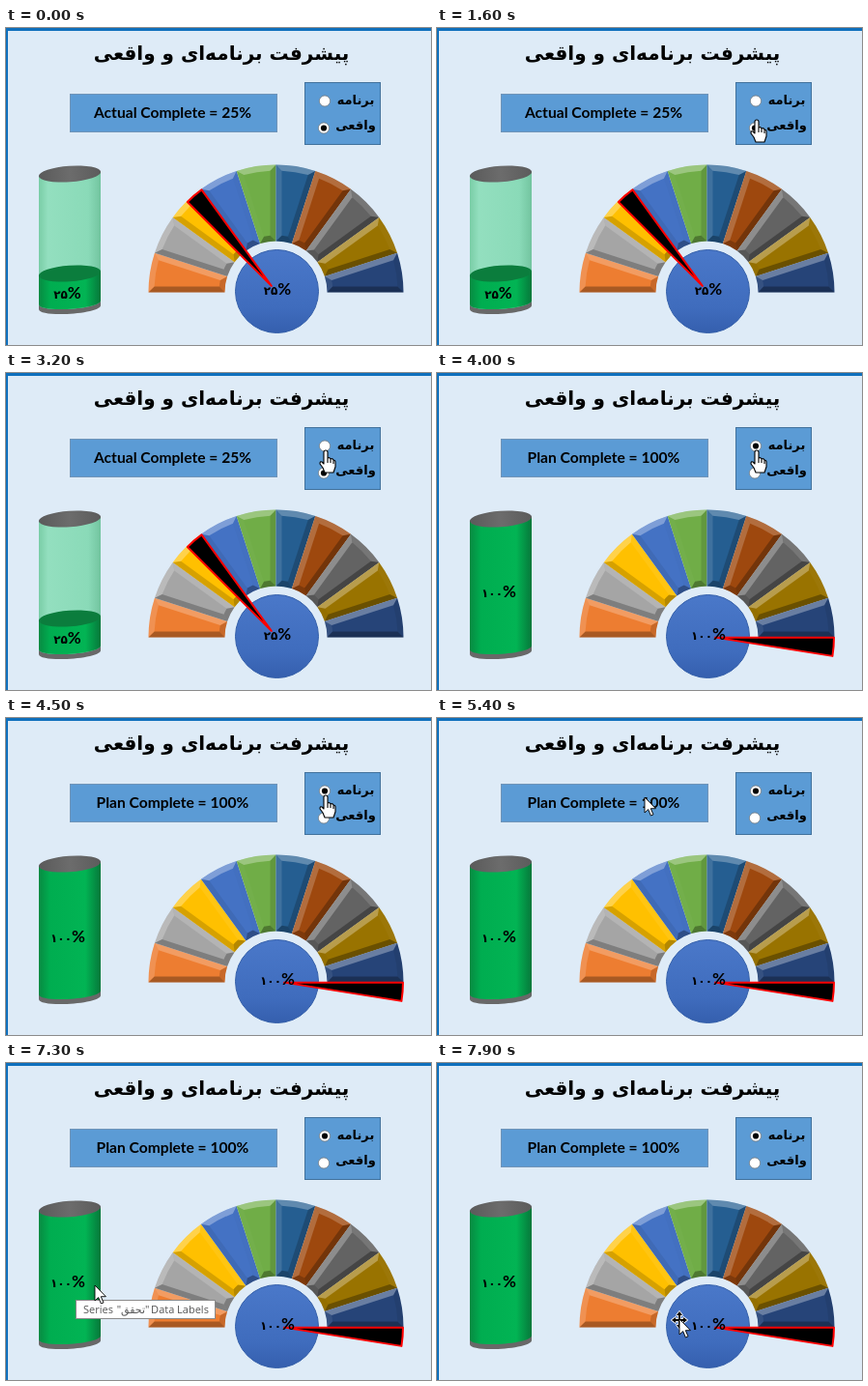
These frames come from a looping animation (440 by 328 pixels, 8000 ms). An HTML page:

```html
<!DOCTYPE html>
<html lang="fa">
<head>
<meta charset="utf-8">
<title>Progress gauge</title>
<style>
html, body { margin: 0; width: 100%; height: 100%; overflow: hidden; background: #deebf7; }
svg { display: block; width: 440px; height: 328px; }
text { text-anchor: middle; fill: #000; }
.fa { font-family: "DejaVu Sans", sans-serif; font-weight: 700; direction: rtl; }
.en { font-family: Lato, "Open Sans", sans-serif; font-weight: 700; font-size: 15.6px; }
.num { direction: ltr; font: 700 12px "DejaVu Sans", sans-serif; }
.pct { font: 700 17px Lato, sans-serif; }
.tip text { font: 11px "Open Sans", sans-serif; fill: #575757; }
</style>
</head>
<body>
<svg viewBox="0 0 440 328">
  <defs>
    <linearGradient id="glass">
      <stop offset="0" stop-color="#79cda6"/><stop offset=".15" stop-color="#93dfbf"/>
      <stop offset=".8" stop-color="#8adab8"/><stop offset="1" stop-color="#72c49f"/>
    </linearGradient>
    <linearGradient id="green">
      <stop offset="0" stop-color="#078a41"/><stop offset=".18" stop-color="#00ad50"/>
      <stop offset=".75" stop-color="#02b454"/><stop offset="1" stop-color="#06783a"/>
    </linearGradient>
    <linearGradient id="cap">
      <stop offset="0" stop-color="#5a5a5a"/><stop offset=".5" stop-color="#6c6c6c"/><stop offset="1" stop-color="#5c5c5c"/>
    </linearGradient>
    <linearGradient id="hub" x2="0" y2="1">
      <stop offset="0" stop-color="#4a78c9"/><stop offset=".7" stop-color="#3f6cbd"/><stop offset="1" stop-color="#355fae"/>
    </linearGradient>
  </defs>

  <rect width="440" height="328" fill="#deebf7"/>
  <path d="M0 0H440V3H2V328H0z" fill="#0f70bd"/>
  <text class="fa" x="223" y="33" font-size="20">پیشرفت برنامه&zwnj;ای و واقعی</text>

  <rect x="66.5" y="68.5" width="214" height="39" fill="#5b9bd5" stroke="#6f94b8"/>
  <text class="en" id="caption" x="172.5" y="93"></text>

  <rect x="309.5" y="56.5" width="78" height="64" fill="#5b9bd5" stroke="#41719c"/>
  <text class="fa" x="362" y="79" font-size="13">برنامه</text>
  <text class="fa" x="362" y="105" font-size="13">واقعی</text>
  <g fill="#fff" stroke="#77808a" stroke-width=".9">
    <circle cx="330" cy="75.5" r="5.6"/><circle cx="329" cy="103.5" r="5.6"/>
  </g>
  <circle id="dot" r="3.1"/>

  <g id="tank"></g>
  <text class="num" id="tankText"><tspan></tspan><tspan class="pct">%</tspan></text>

  <g id="dial"></g>
  <circle cx="280.5" cy="272.5" r="43" fill="url(#hub)" stroke="#3560aa"/>
  <path id="needle" stroke="#f00" stroke-width="2" stroke-linejoin="round"/>
  <text class="num" id="dialText" x="281" y="276"><tspan></tspan><tspan class="pct">%</tspan></text>

  <g class="tip" id="tip">
    <rect x="72.5" y="245.5" width="144" height="19" fill="#fff" stroke="#8a8a8a"/>
    <text x="95.5" y="259">Series</text>
    <text x="131.5" y="259" direction="ltr">"تحقق"</text>
    <text x="180" y="259">Data Labels</text>
  </g>

  <g id="cursor" fill="#fff" stroke="#000" stroke-linejoin="round">
    <path id="hand" stroke-width="1.1" d="M0 0Q2 0 2 2V8Q4 7 5 9Q7 8 8 10Q10 10 10 12V17L8 23H-1L-3 18L-6 14Q-6 11 -4 12L-2 14V2Q-2 0 0 0zM2 8V13M5 9V13M8 10V14"/>
    <path id="cross" fill="#000" stroke="#fff" stroke-width="1.6" paint-order="stroke" d="M0 -8L3 -4H1V0H4V-2L8 1L4 4V2H1V6H3L0 10L-3 6H-1V2H-4V4L-8 1L-4 -2V0H-1V-4H-3z"/>
    <path id="arrow" stroke-width=".9" d="M0 0V16L3.7 12.6L6.4 19L9 17.9L6.3 11.7H11.4z"/>
  </g>
</svg>
<script>
const LOOP = 8000, SWITCH = 4000;
const CX = 279.5, CY = 273.5, OUT = 132, INN = 53, BEVEL = 6;
const $ = id => document.getElementById(id);
const rad = deg => deg * Math.PI / 180;

// Dial angles run clockwise from the left end
const at = (r, a, x = CX, y = CY) =>
  `${(x - r * Math.cos(a)).toFixed(2)} ${(y - r * Math.sin(a)).toFixed(2)}`;
const arc = (r, a, b) => `M${at(r, a)}A${r} ${r} 0 0 1 ${at(r, b)}`;
const band = (r1, a1, b1, r2, a2, b2) =>
  `${arc(r1, a1, b1)}L${at(r2, b2)}A${r2} ${r2} 0 0 0 ${at(r2, a2)}z`;
const path = (d, fill, op = 1) => `<path d="${d}" fill="${fill}" fill-opacity="${op}"/>`;

// Bevel face lit from above, slightly from the left
function face(d, normal) {
  const lit = Math.sin(normal) * .85 + Math.cos(normal) * .35;
  return path(d, lit > 0 ? '#fff' : '#000', (Math.abs(lit) * .34).toFixed(2));
}

function slice(color, i) {
  const a = rad(i * 18), b = rad(i * 18 + 18);
  const o = OUT - BEVEL, n = INN + BEVEL;
  const po = Math.asin(BEVEL / o), pn = Math.asin(BEVEL / n);
  const side = (e, s) =>
    `M${at(OUT, e)}L${at(o, e + s * po)}L${at(n, e + s * pn)}L${at(INN, e)}z`;
  const mid = (a + b) / 2;
  return path(band(OUT, a, b, INN, a, b), color) +
    face(band(OUT, a, b, o, a + po, b - po), mid) +
    face(band(n, a + pn, b - pn, INN, a, b), mid + Math.PI) +
    face(side(a, 1), a - Math.PI / 2) +
    face(side(b, -1), b + Math.PI / 2);
}

$('dial').innerHTML = ['#ed7d31', '#a5a5a5', '#ffc000', '#4472c4', '#70ad47',
  '#255e91', '#9e480e', '#636363', '#997300', '#264478'].map(slice).join('');

// Tank: sides rise a little to the right
const disc = (y, fill) =>
  `<ellipse cx="66" cy="${y}" rx="32.2" ry="8.3" fill="${fill}" transform="rotate(-4 66 ${y})"/>`;
const tube = (top, end, fill) =>
  path(`M34 ${top + 2}L98 ${top - 2}V${end - 2}C98 ${end + 7} 34 ${end + 11} 34 ${end + 2}z`, fill);

function tank(full) {
  const base = tube(270, 289, '#686868');
  const body = full
    ? tube(151, 284, 'url(#green)')
    : tube(151, 284, 'url(#glass)') + tube(254, 284, 'url(#green)') + disc(254, '#0b7d3d');
  return base + body + disc(151, 'url(#cap)');
}

function needle(p) {
  const a = rad(p * 180), b = a + rad(9), m = (a + b) / 2;
  const x = CX + .5 - 8 * Math.cos(m), y = CY - .5 - 8 * Math.sin(m);
  return `M${x} ${y}L${at(123, a, x, y)}A123 123 0 0 1 ${at(123, b, x, y)}z`;
}

const views = [
  { p: .25, digits: '۲۵', caption: 'Actual Complete = 25%', dot: [329, 103.5], label: [63.5, 280] },
  { p: 1, digits: '۱۰۰', caption: 'Plan Complete = 100%', dot: [330, 75.5], label: [64, 232] }
];
let shown = -1;

function setView(i) {
  if (i === shown) return;
  shown = i;
  const v = views[i];
  $('caption').textContent = v.caption;
  $('dot').setAttribute('cx', v.dot[0]);
  $('dot').setAttribute('cy', v.dot[1]);
  $('tank').innerHTML = tank(i === 1);
  $('needle').setAttribute('d', needle(v.p));
  $('tankText').setAttribute('x', v.label[0]);
  $('tankText').setAttribute('y', v.label[1]);
  for (const id of ['tankText', 'dialText']) $(id).firstElementChild.textContent = v.digits;
}

// Pointer stops: time, x, y
const stops = [
  [300, 390, 99], [700, 329, 95], [900, 366, 97], [1100, 366, 97], [1200, 328, 95],
  [1500, 328, 95], [1600, 331, 95], [1900, 370, 100], [2100, 366, 76], [2400, 331, 80],
  [2700, 368, 80], [2900, 368, 102], [3200, 331, 80], [3300, 370, 88], [3400, 332, 86],
  [3500, 332, 86], [3600, 331, 80], [4500, 331, 80], [4800, 305, 92], [5200, 220, 86],
  [5300, 240, 91], [5400, 215, 82], [5800, 215, 82], [6000, 260, 150], [6200, 310, 272],
  [6350, 190, 250], [6500, 79, 211], [6600, 66, 216], [6700, 78, 207], [6800, 88, 227],
  [7000, 88, 227], [7100, 92, 230], [7400, 92, 230], [7600, 290, 296], [7700, 325, 284],
  [7900, 251, 265]
];

function pointer(t) {
  const i = stops.findIndex(s => s[0] > t);
  if (i < 0) return stops[stops.length - 1].slice(1);
  const [t0, x0, y0] = stops[i - 1], [t1, x1, y1] = stops[i];
  const k = (t - t0) / (t1 - t0);
  return [x0 + (x1 - x0) * k, y0 + (y1 - y0) * k];
}

const show = (id, on) => { $(id).style.display = on ? '' : 'none'; };

function draw(now) {
  const t = Math.floor(now % LOOP / 100) * 100;
  setView(t < SWITCH ? 0 : 1);
  show('tip', t >= 7200 && t < 7500);
  show('cursor', t >= 300);
  if (t >= 300) {
    const [x, y] = pointer(t);
    const hand = x > 309 && x < 388 && y > 56 && y < 121;
    show('hand', hand);
    show('arrow', !hand);
    show('cross', t >= 7500);
    $('cursor').setAttribute('transform', `translate(${x.toFixed(1)} ${y.toFixed(1)})`);
  }
}

const start = performance.now();
function tick() {
  draw(Math.max(0, performance.now() - start));
  requestAnimationFrame(tick);
}
tick();
</script>
</body>
</html>
```
